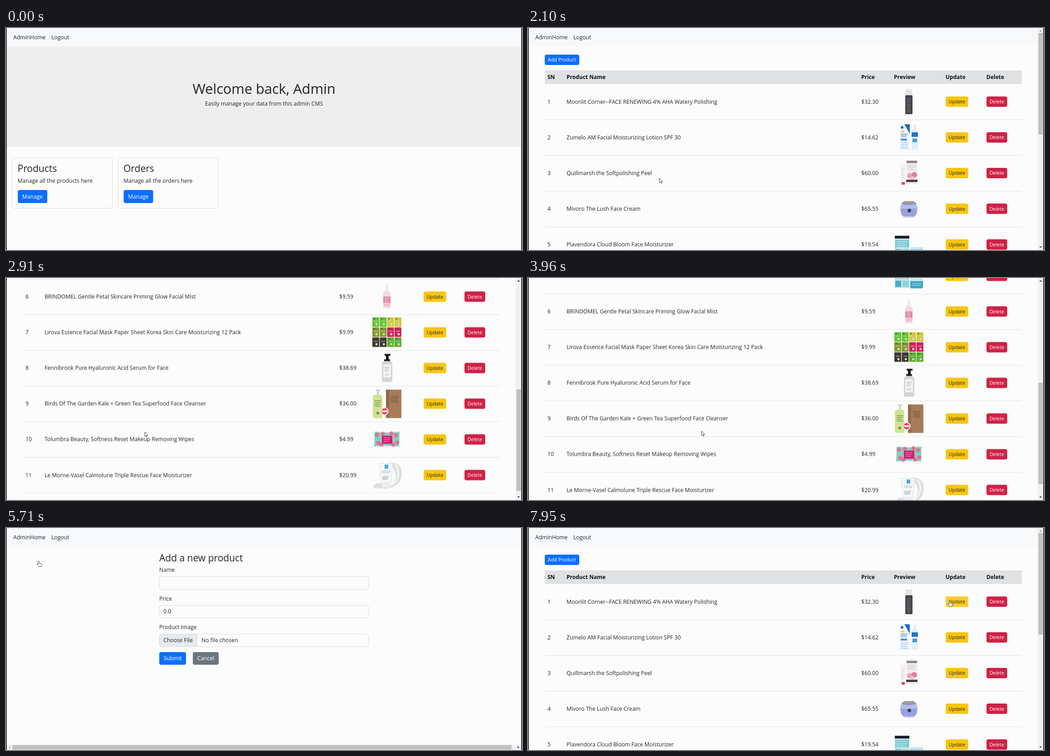
An HTML page for the animation above (8 s loop, 1138x492 px).

```html
<!DOCTYPE html>
<html lang="en">
<head>
<meta charset="utf-8">
<title>Shop admin</title>
<style>
html, body { margin: 0; width: 100%; height: 100%; overflow: hidden; background: #fcfcfc; }
svg { display: block; width: 100%; height: 100%; }
text { font: 12.15px "Open Sans", "Noto Sans", sans-serif; fill: #212529; white-space: pre; }
.h1 { font-size: 30.7px; }
.h3 { font-size: 21px; }
.th { font-size: 12px; font-weight: 700; fill: #101214; }
.sm { font-size: 10.8px; }
.mid { text-anchor: middle; }
.light { fill: #fff; }
</style>
</head>
<body>
<svg id="stage" viewBox="0 0 1138 492"></svg>
<script>
const LOOP = 8000;
const ROW = 79.1, FIRST_ROW = 163.1;
const OPEN_TABLE = 1295, OPEN_FORM = 5700, BACK_TO_TABLE = 6955, IMAGES_LOADED = 1480;
const BLUE = '#0d6efd', YELLOW = '#f8c510', RED = '#cf2145', GREY = '#6c757d';

// Markup helpers
const rect = (x, y, w, h, fill, r = 0, extra = '') =>
  `<rect x="${x}" y="${y}" width="${w}" height="${h}" rx="${r}" fill="${fill}" ${extra}/>`;
const path = (d, fill, extra = '') => `<path d="${d}" fill="${fill}" ${extra}/>`;
const circle = (x, y, r, fill) => `<circle cx="${x}" cy="${y}" r="${r}" fill="${fill}"/>`;
const text = (x, y, s, cls = '') => `<text x="${x}" y="${y}" class="${cls}">${s}</text>`;
const box = (x, y, w, h) => rect(x + .5, y + .5, w - 1, h - 1, 'none', 4.5, 'stroke="#dadde1"');
const lines = (x, y, w, n, gap, color) =>
  Array.from({ length: n }, (_, i) => rect(x, y + i * gap, w - (i % 3), 1, color)).join('');
const button = (x, y, w, h, label, fill, { cls = '', hover, id } = {}) =>
  rect(x, y, w, h, fill, 4) +
  (hover ? rect(x, y, w, h, hover, 4, `id="${id}"`) : '') +
  text(x + w / 2, y + h / 2 + (cls.includes('sm') ? 3.9 : 4.4), label, `mid ${cls}`);

const navbar = rect(0, 0, 1138, 41, '#f7f8fa') + text(16, 25, 'AdminHome') + text(100, 25, 'Logout');

// Home page
const card = (x, title, what, hover) =>
  box(x, 287, 222, 113) +
  text(x + 12.5, 319, title, 'h3') +
  text(x + 12.5, 343, `Manage all the ${what} here`) +
  button(x + 13, 359, 65, 29, 'Manage', BLUE, { cls: 'light', ...hover });

const home = navbar + rect(0, 41, 1138, 222, '#eeeeee') +
  text(569, 146, 'Welcome back, Admin', 'h1 mid') +
  text(569, 171.5, 'Easily manage your data from this admin CMS', 'mid') +
  card(13, 'Products', 'products', { hover: '#0b5ed7', id: 'hoverManage' }) +
  card(246.5, 'Orders', 'orders');

// Product pictures, drawn around their own centre
const maskColors = ['#62c233', '#cfc83c', '#81982f', '#d31f60', '#3a3532', '#5cac30'];
const pictures = [
  () => rect(-7, -27, 14, 14, '#e4e4e4', 1) + rect(-8, -14, 16, 42, '#46464b', 2) +
    lines(-4, -6, 8, 8, 4, '#85858a'),
  () => rect(-20, -29, 22, 57, '#f0f5fa') + path('M-10-29H2V-8Z', '#1c70c8') +
    circle(-15, -22, 3, '#1c70c8') + rect(-18, -14, 8, 3, '#f2c437') + lines(-18, -8, 15, 3, 3, '#2d7fd0') +
    rect(-18, 3, 14, 4, '#3c8fd8') + lines(-18, 12, 17, 4, 4, '#86b7e2') +
    path('M10-28H16V-20L20-14V24Q20 28 13 28T6 24V-14L10-20Z', '#e6eef6') +
    rect(6, -11, 14, 10, '#1f76cc') + rect(8, 3, 10, 8, '#4a97dc'),
  () => rect(-6, -29, 25, 54, '#f1edec') + rect(-5, -27, 23, 5, '#8e8488') + rect(-6, 15, 25, 5, '#43363c') +
    lines(-3, -17, 18, 3, 4, '#c5bcc0') + circle(2, 6, 6, '#e9a3b9') + circle(12, 4, 6, '#dd7fa0') + circle(8, 11, 4, '#f2c6d3') +
    path('M-19-20H-7L-9 19H-17Z', '#f5f1f2') + lines(-17, -10, 8, 5, 5, '#cfc7ca') + rect(-16, 20, 7, 6, '#e33c84', 1),
  () => path('M-16-11H16Q21-3 17 11Q14 20 0 20T-17 11Q-21-3-16-11Z', '#98a3dc') +
    path('M-16-11H16Q19-6 19 0H-19Q-19-6-16-11Z', '#b6bdea') +
    '<ellipse cx="0" cy="-12" rx="16" ry="4" fill="#9298bd"/>' +
    rect(-12, -17, 24, 2, '#b99e79', 1) + circle(1, 4, 4, '#39415f') + rect(-12, 17, 24, 3, '#cfd5f2', 1),
  () => rect(-31, -19, 32, 46, '#c6e7ec') + rect(-31, -19, 32, 6, '#181c20') + rect(-30, -10, 30, 17, '#72c6cf') +
    lines(-28, -7, 25, 4, 4, '#eefafa') + rect(-30, 11, 13, 14, '#48adbd') + rect(-14, 11, 14, 14, '#8fd2da') +
    rect(3, 7, 28, 21, '#38a6c5', 3) + rect(3, 6, 28, 6, '#c9e6ee', 2) + lines(7, 17, 20, 2, 4, '#d3f0f5'),
  () => rect(-4, -27, 8, 16, '#f3e9ec', 2) + path('M-4-12H4Q8-9 8-4V23Q8 26 5 26H-5Q-8 26-8 23V-4Q-8-9-4-12Z', '#f3d9e0') +
    rect(-8, 0, 16, 14, '#de8aa2') + lines(-5, 3, 10, 3, 4, '#f6dbe3') + rect(-7, 16, 14, 5, '#ecbccb'),
  () => Array.from({ length: 12 }, (_, i) => {
    const col = i % 4, row = i >> 2, x = -32 + col * 16.3, y = -33 + row * 22.3;
    return rect(x, y, 15, 21, maskColors[row * 2 + (col >> 1)]) + circle(x + 4, y + 3, 1.5, '#4c4c30') +
      rect(x + 3, y + 8, 9, 1, '#e8ecc0') + circle(x + 9, y + 15, 2.5, '#d9e3b4');
  }).join(''),
  () => path('M-5-31H8V-27H4V-19H7V-15H-6V-19H-2V-27H-5Z', '#161616') +
    path('M-6-15H7Q12-13 12-8V27Q12 31 8 31H-8Q-11 31-11 27V-8Q-11-13-6-15Z', '#d3d5d3') +
    rect(-8, -8, 17, 29, '#f3f3f1') + lines(-5, -2, 11, 3, 4, '#a5a5a2') + lines(-4, 13, 9, 2, 3, '#bbbbb8'),
  () => path('M-24-31H-14V-28H-18V-20H-22V-28H-24Z', '#c9cfc5') +
    path('M-25-20H-15Q-10-19-10-14V28Q-10 32-14 32H-27Q-31 32-31 28V-14Q-31-19-25-20Z', '#cfe392') +
    lines(-27, -7, 14, 4, 4, '#4f6b34') + circle(-20, 21, 3, '#6e8b45') +
    rect(-2, -31, 34, 63, '#a77b59') + rect(-2, -31, 7, 63, '#94694b') + lines(9, -16, 17, 4, 4, '#674529') +
    circle(-5, 17, 9, '#fbeaec') + circle(-5, 17, 7, '#df4660') + rect(-11, 15, 12, 4, '#fbeaec'),
  () => path('M-27-17Q0-13 28-17L27 16Q0 13-28 16Z', '#83cfc2') +
    [[-22, -10], [-19, 8], [-9, -12], [20, -9], [23, 7], [14, 12], [-12, 12], [10, -13]]
      .map(([x, y]) => circle(x, y, 4.5, '#e5708f')).join('') +
    rect(-11, -8, 23, 18, '#d91c76') + lines(-7, -4, 14, 3, 4, '#f5a8c9'),
  () => path('M8-28Q34-26 33-1Q31 25 0 30L-29 29Q-32 22-20 18L10 20Q24 10 18-8Z', '#dcdddc') +
    path('M18-23Q31-8 21 12Q14 22 4 24', 'none', 'stroke="#f5f5f4" stroke-width="4"') +
    path('M-17-26H13L9 17H-13Z', '#f5f6f7', 'stroke="#dde0e2"') + rect(-11, 17, 18, 11, '#ececec', 2) +
    rect(-5, -23, 8, 9, '#4aa6df') + lines(-11, -9, 19, 2, 3, '#9fb2c0') + lines(-10, 3, 14, 3, 3, '#7f8d98')
];

// Product table
const products = [
  ['Moonlit Corner--FACE RENEWING 4% AHA Watery Polishing', '32.30'],
  ['Zumelo AM Facial Moisturizing Lotion SPF 30', '14.62'],
  ['Quillmarsh the Softpolishing Peel', '60.00'],
  ['Mivoro The Lush Face Cream', '65.55'],
  ['Plavendora Cloud Bloom Face Moisturizer', '19.54'],
  ['BRINDOMEL Gentle Petal Skincare Priming Glow Facial Mist', '9.59'],
  ['Lirova Essence Facial Mask Paper Sheet Korea Skin Care Moisturizing 12 Pack', '9.99'],
  ['Fennibrook Pure Hyaluronic Acid Serum for Face', '38.69'],
  ['Birds Of The Garden Kale + Green Tea Superfood Face Cleanser', '36.00'],
  ['Tolumbra Beauty, Softness Reset Makeup Removing Wipes', '4.99'],
  ['Le Morne-Vasel Calmolune Triple Rescue Face Moisturizer', '20.99']
];
const columns = [[43, 'SN'], [85, 'Product Name'], [735, 'Price'], [807, 'Preview'], [921, 'Update'], [1011, 'Delete']];

const picture = i => `<g transform="translate(840 ${FIRST_ROW + i * ROW})">${pictures[i]()}</g>`;
const productRow = ([name, price], i) => {
  const y = FIRST_ROW + i * ROW;
  const hover = i ? {} : { hover: '#ffca2c', id: 'hoverUpdate' };
  return text(43, y + 4.4, i + 1) + text(85, y + 4.4, name) + text(735, y + 4.4, '$' + price) +
    button(921.2, y - 11.3, 49.6, 23, 'Update', YELLOW, { cls: 'sm', ...hover }) +
    button(1011.2, y - 11.3, 45.6, 23, 'Delete', RED, { cls: 'sm light' }) +
    rect(37, y + 39.7, 1052, 1, '#dfe2e6');
};

const table = `<g id="scroller">${navbar}
  ${button(37, 59, 76, 23, 'Add Product', BLUE, { cls: 'sm light', hover: '#0b5ed7', id: 'hoverAdd' })}
  ${rect(37, 94, 1052, 30, '#e0e1e2')}
  ${columns.map(([x, s]) => text(x, 113, s, 'th')).join('')}
  ${products.map(productRow).join('')}
  ${picture(0)}${picture(1)}
  <g id="lateImages">${products.map((_, i) => i > 1 ? picture(i) : '').join('')}</g></g>
  ${rect(1124, 0, 14, 492, '#f1f1f1')}
  ${path('M1127.5 8L1130.5 4.5L1133.5 8Z', '#a8a8a8')}
  ${path('M1127.5 8L1130.5 4.5L1133.5 8Z', '#505050', 'id="upArrow"')}
  ${path('M1127.5 484L1130.5 487.5L1133.5 484Z', '#505050')}
  ${rect(1125.5, 11, 10, 265, '#c1c1c1', 0, 'id="tallThumb"')}
  ${rect(1125.5, 11, 10, 225, '#c1c1c1', 0, 'id="thumb"')}`;

// Form page
const form = navbar +
  text(338, 73.5, 'Add a new product', 'h3') +
  text(338, 97, 'Name') + box(337.5, 107.5, 463, 29) +
  text(338, 160.5, 'Price') + box(337.5, 171, 463, 28.5) + text(347, 189, '0.0') +
  text(338, 224, 'Product Image') + rect(338, 235, 84, 28, '#e7eaed', 4) + rect(421, 235, 1, 28, '#dadde1') +
  box(337.5, 234.5, 463, 29) + text(347, 253, 'Choose File') + text(431, 253, 'No file chosen') +
  button(338, 275, 59, 28, 'Submit', BLUE, { cls: 'light' }) +
  button(412, 275, 57, 28, 'Cancel', GREY, { cls: 'light', hover: '#5c636a', id: 'hoverCancel' }) +
  rect(0, 480, 1138, 12, '#f1f1f1') + rect(14, 481, 1101, 10, '#c1c1c1') +
  path('M9.5 483L6.5 486L9.5 489Z', '#a8a8a8') + path('M1128.5 483L1132 486L1128.5 489Z', '#505050');

const outline = 'stroke="#3c3c3c" stroke-width=".9" stroke-linejoin="round"';
const pointer = `<g id="pointer">
  ${path('M0 0V10L2.4 8L4 11.5L5.3 11L3.8 7.4H6.8Z', '#fff', `id="arrow" ${outline}`)}
  ${path('M-1.2 1.2a1.2 1.2 0 0 1 2.4 0V5L5.5 6Q7.5 6.5 7 9L6 12.5H0L-4 7.5Q-3 6-1.2 8Z', '#fff', `id="hand" ${outline}`)}
  </g>`;

const stage = document.getElementById('stage');
stage.innerHTML = rect(0, 0, 1138, 492, '#fcfcfc') +
  `<g id="home">${home}</g><g id="table">${table}</g><g id="form">${form}</g>` + pointer +
  rect(0, 0, 1.5, 492, '#111') + rect(1136.5, 0, 1.5, 492, '#111');

// Motion helpers
const play = (id, frames) =>
  document.getElementById(id).animate(frames, { duration: LOOP, iterations: Infinity });

// One keyframe per time: a later mark replaces an earlier one.
const show = (id, ...spans) => {
  const marks = new Map([[0, 0], ...spans.flatMap(([from, to]) => [[from, 1], [to, 0]]), [LOOP, 0]]);
  play(id, [...marks].map(([t, opacity]) => ({ offset: t / LOOP, opacity, easing: 'step-end' })));
};
const move = (id, steps) => {
  const all = [[0, ...steps[0].slice(1)], ...steps, [LOOP, ...steps.at(-1).slice(1)]];
  play(id, all.map(([t, x, y]) => ({ offset: t / LOOP, transform: `translate(${x}px, ${y}px)` })));
};

show('home', [0, OPEN_TABLE]);
show('table', [OPEN_TABLE, OPEN_FORM], [BACK_TO_TABLE, LOOP]);
show('form', [OPEN_FORM, BACK_TO_TABLE]);
show('lateImages', [IMAGES_LOADED, LOOP]);
show('tallThumb', [0, IMAGES_LOADED]);
show('thumb', [IMAGES_LOADED, LOOP]);
show('upArrow', [2200, 4600]);
show('hoverManage', [800, OPEN_TABLE]);
show('hoverAdd', [5380, OPEN_FORM]);
show('hoverCancel', [6690, BACK_TO_TABLE]);
show('hoverUpdate', [7690, LOOP]);

const scroll = [
  [2190, 0], [2330, 110], [2470, 253.5], [2660, 400], [2900, 517.5],
  [3880, 517.5], [3960, 485.5], [4100, 360], [4300, 160], [4450, 50], [4600, 0]
];
move('scroller', scroll.map(([t, y]) => [t, 0, -y]));
move('thumb', scroll.map(([t, y]) => [t, 0, y * .456]));

move('pointer', [
  [30, 812, -16], [300, 560, 130], [560, 230, 320], [830, 62, 384], [1000, 58, 385],
  [1420, 58, 385], [1800, 190, 350], [2100, 290, 333], [2470, 294, 332], [2900, 306, 341],
  [3050, 306, 341], [3820, 383, 339], [4660, 383, 339], [5100, 190, 190], [5470, 72, 73],
  [6200, 72, 73], [6480, 270, 195], [6760, 440, 287], [7000, 440, 287], [7400, 720, 215], [7760, 930, 161]
]);
show('hand', [780, 1450], [5370, 6220], [6690, 7010], [7690, LOOP]);
show('arrow', [0, 780], [1450, 5370], [6220, 6690], [7010, 7690]);
</script>
</body>
</html>
```
